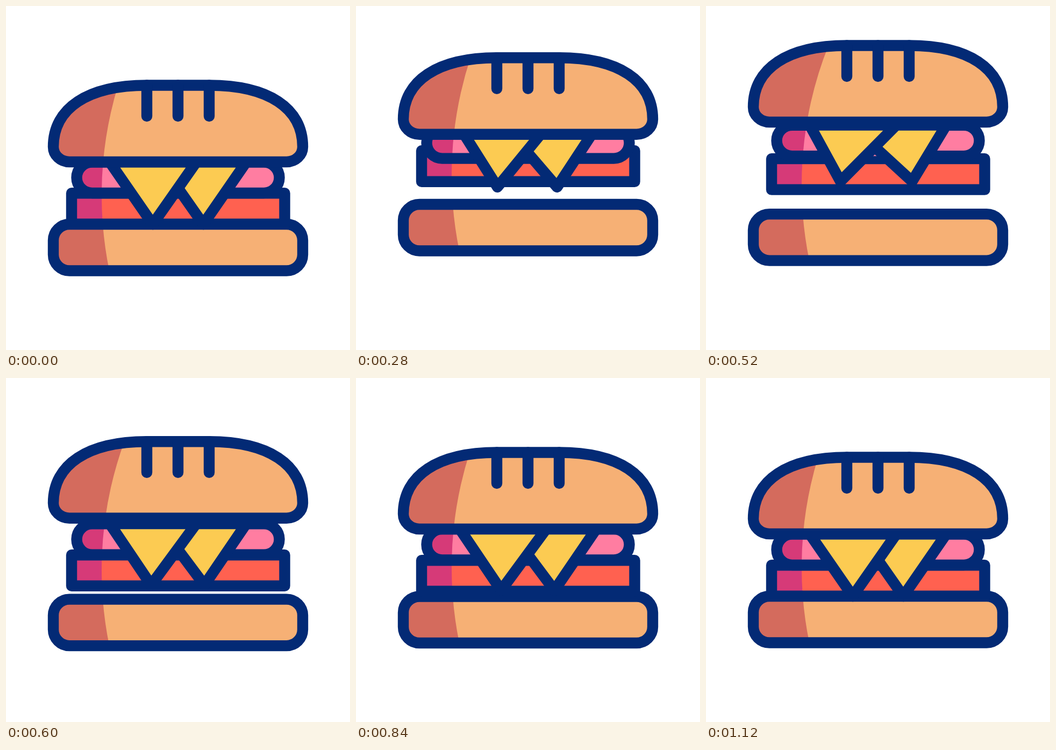
Animation, 640 px wide and 640 px high, one loop 1.2 s. Source, as an HTML page with a canvas:

```html
<!DOCTYPE html>
<html lang="en">
<head>
<meta charset="utf-8">
<title>Bouncing sandwich</title>
<style>
  html, body { margin: 0; width: 100%; height: 100%; overflow: hidden; background: #fff; }
  canvas { display: block; width: 640px; height: 640px; }
</style>
</head>
<body>
<canvas id="stage" width="640" height="640"></canvas>
<script>
const ctx = document.getElementById('stage').getContext('2d');
const LOOP = 1200, STEP = 40, END = 1120, REBOUND = 840;
const NAVY = '#032a75', BUN = '#f6b075', CRUST = '#d46b5d';
const PINK = '#ff7da1', RED = '#ff6150', BERRY = '#d63a78', CHEESE = '#fccb52';

// Eases in and out between [time, value] key points
function glide(time, keys) {
  let [t0, v0] = keys[0];
  for (const [t1, v1] of keys) {
    if (time < t1) {
      if (time <= t0) return v0;
      return v0 + (v1 - v0) * (1 - Math.cos(Math.PI * (time - t0) / (t1 - t0))) / 2;
    }
    [t0, v0] = [t1, v1];
  }
  return v0;
}

// Crouch, leap to a peak, land and rebound; upper layers lag behind
const hop = (start, peak, land, rebound) =>
  time => glide(time, [[0, 0], [start, 1.5], peak, land, [REBOUND, rebound], [END, 0]]);

const motion = {
  base: hop(125, [372, -54], [655, 11.5], 0.5),
  tomato: hop(88, [385, -110], [700, 8], -9),
  ham: hop(111, [408, -107], [700, 12], -9.5),
  top: hop(140, [420, -104], [692, -3.5], -9),
  swing: time => glide(time, [[120, 0], [490, -25], [690, 13], [REBOUND, -3], [END, 0]])
};

function box(x, y, w, h, r) {
  const path = new Path2D();
  path.roundRect(x, y, w, h, r);
  return path;
}

const topBun = new Path2D(
  'M262 147.5H378C488 147.5 552 190 552 262A30 28 0 0 1 522 290H118A30 28 0 0 1 88 262C88 190 152 147.5 262 147.5Z');
const cuts = new Path2D('M262 147.5V205M320 147.5V205M378 147.5V205');
const baseBun = box(88, 406, 464, 86.5, 30);
const ham = box(131.5, 290.5, 377, 57.5, 28.75);
const tomato = box(122, 348.3, 396.5, 57.5, 0);
const shade = new Path2D('M0 52H245.5A700 700 0 0 0 245.5 652H0Z');

// The shadow edge always travels with the lower bun
function layer(path, dy, shadeDy, light, dark) {
  ctx.save();
  ctx.translate(0, dy);
  ctx.fillStyle = light;
  ctx.fill(path);
  ctx.save();
  ctx.clip(path);
  ctx.translate(0, shadeDy - dy);
  ctx.fillStyle = dark;
  ctx.fill(shade);
  ctx.restore();
  ctx.stroke(path);
  ctx.restore();
}

function slice(x1, x2, y, tipX, tipY) {
  ctx.beginPath();
  ctx.moveTo(x1, y);
  ctx.lineTo(x2, y);
  ctx.lineTo(tipX, tipY);
  ctx.closePath();
  ctx.fillStyle = CHEESE;
  ctx.fill();
  ctx.stroke();
}

function draw(time) {
  const pose = {};
  for (const name in motion) pose[name] = motion[name](time);

  ctx.fillStyle = '#fff';
  ctx.fillRect(0, 0, 640, 640);
  ctx.strokeStyle = NAVY;
  ctx.lineWidth = 20.4;
  ctx.lineJoin = ctx.lineCap = 'round';

  layer(baseBun, pose.base, pose.base, BUN, CRUST);
  layer(tomato, pose.tomato, pose.base, RED, BERRY);
  layer(ham, pose.ham, pose.base, PINK, BERRY);

  // Gap in the ham outline behind the crossing slices
  ctx.fillStyle = PINK;
  ctx.fillRect(308, 336 + pose.ham, 20, 12);

  const y = 290.3 + pose.ham;
  const tipY = 406 + pose.ham - 0.48 * Math.abs(pose.swing);
  const spread = 0.72 * pose.swing;
  slice(286 + spread, 447, y, 367 - spread, tipY);
  slice(193, 354, y, 273 + pose.swing, tipY);

  layer(topBun, pose.top, pose.base, BUN, CRUST);
  ctx.save();
  ctx.translate(0, pose.top);
  ctx.stroke(cuts);
  ctx.restore();
}

const start = performance.now();
function tick() {
  const time = (performance.now() - start) % LOOP;
  draw(Math.min(END, Math.floor(time / STEP) * STEP));
  requestAnimationFrame(tick);
}
tick();
</script>
</body>
</html>
```
